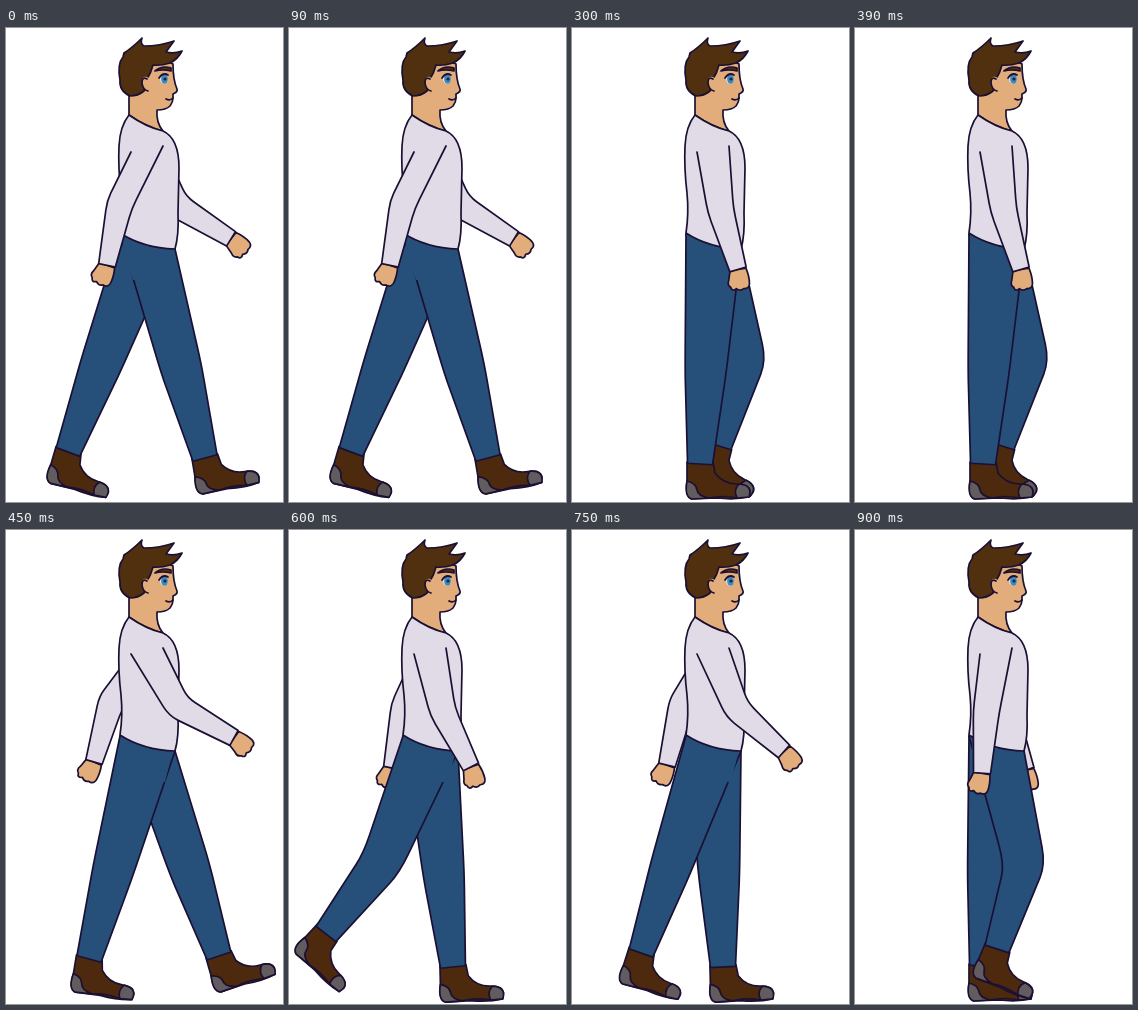
Animation of 277 by 474 pixels, one loop 1.05 s. Source, as an HTML page:

```html
<!DOCTYPE html>
<html lang="en">
<head>
<meta charset="utf-8">
<title>Walk cycle</title>
<style>
  html, body { margin: 0; width: 100%; height: 100%; overflow: hidden; background: #fff; }
  svg { display: block; width: 100%; height: 100%; }
  path { stroke: #1b1033; stroke-width: 1.7; stroke-linejoin: round; stroke-linecap: round; }
  .shirt { fill: #e0dbe6; }
  .jeans { fill: #264f7a; }
  .skin { fill: #e2ad7b; }
  .hair { fill: #50300f; }
  .shoe { fill: #4d2a0d; }
  .sole { fill: #625c5f; }
  .line { fill: none; }
  .bare { stroke: none; }
</style>
</head>
<body>
<svg id="stage" viewBox="0 0 277 474"></svg>
<script>
const STEP = 150;
const stage = document.getElementById('stage');
const path = (kind, d) => `<path class="${kind}" d="${d}"/>`;
const place = ([x, y], turn, art) => `<g transform="translate(${x} ${y}) rotate(${turn})">${art}</g>`;

const mix = (a, b, t) => a.map((v, i) => v + (b[i] - v) * t);
// Unit vector pointing to the walker's front, square to the line a-b.
const forward = (a, b) => {
  const length = Math.hypot(b[0] - a[0], b[1] - a[1]);
  return [(b[1] - a[1]) / length, (a[0] - b[0]) / length];
};
const shift = (p, direction, amount) => p.map((v, i) => v + direction[i] * amount);

const ARM = { kind: 'shirt', back: [125, 124], front: [157, 118], middle: 0.5, jointWidth: 13, endWidth: 8.5 };
const LEG = { kind: 'jeans', back: [114, 206], front: [169, 221], middle: 0.59, jointWidth: 20.5, endWidth: 12.5 };
const rootOf = part => mix(part.back, part.front, 0.5);

// A tapered sleeve or trouser leg, open at the top and bent at its joint.
function limb(part, end, bend) {
  const root = rootOf(part);
  const ahead = forward(root, end);
  const joint = shift(mix(root, end, part.middle), ahead, bend);
  const endAhead = forward(joint, end);
  const edge = (start, side) => {
    const corner = shift(joint, ahead, side * part.jointWidth);
    const tip = shift(end, endAhead, side * part.endWidth);
    return [start, mix(start, corner, 0.85), corner, mix(corner, tip, 0.15), tip];
  };
  const back = edge(part.back, -1), front = edge(part.front, 1);
  const d = `M${back[0]}L${back[1]}Q${back[2]} ${back[3]}L${back[4]}` +
    `L${front[4]}L${front[3]}Q${front[2]} ${front[1]}L${front[0]}`;
  const turn = Math.atan2(-endAhead[1], endAhead[0]) * -180 / Math.PI;
  return { art: path(part.kind, d), turn };
}

const fist = path('skin', 'M-8 -1L-12 8Q-15 12 -12 15Q-12 20 -7 18Q-4 22 0 20Q5 22 7 17Q9 10 8 1Z');

const shoe =
  path('shoe', 'M-13 -2H13L15 9Q23 20 37 20Q49 20 50 27L49 33Q35 36 17 34L-8 35Q-15 33 -13 17Z') +
  path('sole', 'M39 20Q33 26 37 34L49 33Q53 21 39 20Z') +
  path('sole', 'M-13 17Q-4 19 -3 26Q-2 32 9 34L-8 35Q-16 33 -13 17Z') +
  path('line', 'M9 34Q22 31 37 34');

// The wrist swings on a circle; the elbow bends more the farther it reaches.
function arm(reach) {
  const [x, y] = rootOf(ARM);
  const wrist = [x + reach, y + Math.sqrt(123 ** 2 - reach ** 2)];
  const { art, turn } = limb(ARM, wrist, -Math.abs(reach) / 5);
  return place(wrist, turn, fist) + art;
}

// The knee bends as the foot nears the hip; a lifted foot drops its toe behind and raises it in front.
function leg(...ankle) {
  const hip = rootOf(LEG);
  const slack = Math.max(0, 221.5 - Math.hypot(ankle[0] - hip[0], ankle[1] - hip[1]));
  const tilt = (436 - ankle[1]) * (ankle[0] > hip[0] + 30 ? -1.6 : 1.35);
  return place(ankle, tilt, shoe) + limb(LEG, ankle, 7 * Math.sqrt(slack)).art;
}

const pelvis = path('jeans bare', 'M117 200H166L165 228L159 252H127L117 225Z');

const torso = path('shirt',
  'M123 87Q140 99 157 103C168 108 173 120 173 140L172 185Q173 207 169 221Q137 220 114 205Q117 185 115 165Q112 140 113 118Q114 98 123 87Z');

const head =
  path('skin', 'M123 60V87Q140 99 157 103Q150 95 151 82Q160 82 164 78Q167 74 167 70L167 66Q172 64 171 61Q167 52 167 36L150 28Z') +
  path('hair', 'M124 68Q113 63 114 52Q111 36 117 29L118 25Q126 20 136 10Q134 16 138 18Q154 18 168 13L160 24Q168 26 176 23Q172 31 164 35Q154 38 147 37Q145 45 141 51L138 63Q132 68 124 68Z') +
  path('skin bare', 'M143 50Q136 46 136 54Q137 62 143 64Z') +
  path('line', 'M141 51Q136 48 136 55Q137 62 142 63') +
  path('hair', 'M149 43Q156 37 165 40L165 43Q157 41 149 43Z') +
  '<ellipse cx="158" cy="51" rx="4" ry="5" fill="#d9e8f0"/>' +
  '<ellipse cx="158.500" cy="51" rx="3.400" ry="4.800" fill="#3f8abb"/>' +
  '<circle cx="159" cy="51" r="1.600" fill="#142443"/>' +
  path('line', 'M153 50Q157 44 162 47') +
  path('line', 'M160 71Q164 73 167 70');

const pose = ({ farReach, farLeg, nearLeg, nearReach }) =>
  arm(farReach) + farLeg + nearLeg + pelvis + head + torso + arm(nearReach);

const poses = [
  { farReach: 84, nearReach: -40, farLeg: leg(62, 424), nearLeg: leg(199, 430) },
  { farReach: 30, nearReach: -14, farLeg: leg(42, 395), nearLeg: leg(138, 435) },
  { farReach: 20, nearReach: 25, farLeg: leg(147, 418), nearLeg: leg(128, 436) },
  { farReach: -53, nearReach: 87, farLeg: leg(213, 426), nearLeg: leg(83, 429) },
  { farReach: -38, nearReach: 41, farLeg: leg(164, 437), nearLeg: leg(37, 404) },
  { farReach: -46, nearReach: 71, farLeg: leg(151, 437), nearLeg: leg(69, 423) },
  { farReach: 30, nearReach: -14, farLeg: leg(127, 436), nearLeg: leg(142, 419) }
].map(pose);

let shown = -1;
function draw() {
  const index = Math.floor(performance.now() / STEP) % poses.length;
  if (index !== shown) stage.innerHTML = poses[shown = index];
  requestAnimationFrame(draw);
}
draw();
</script>
</body>
</html>
```
